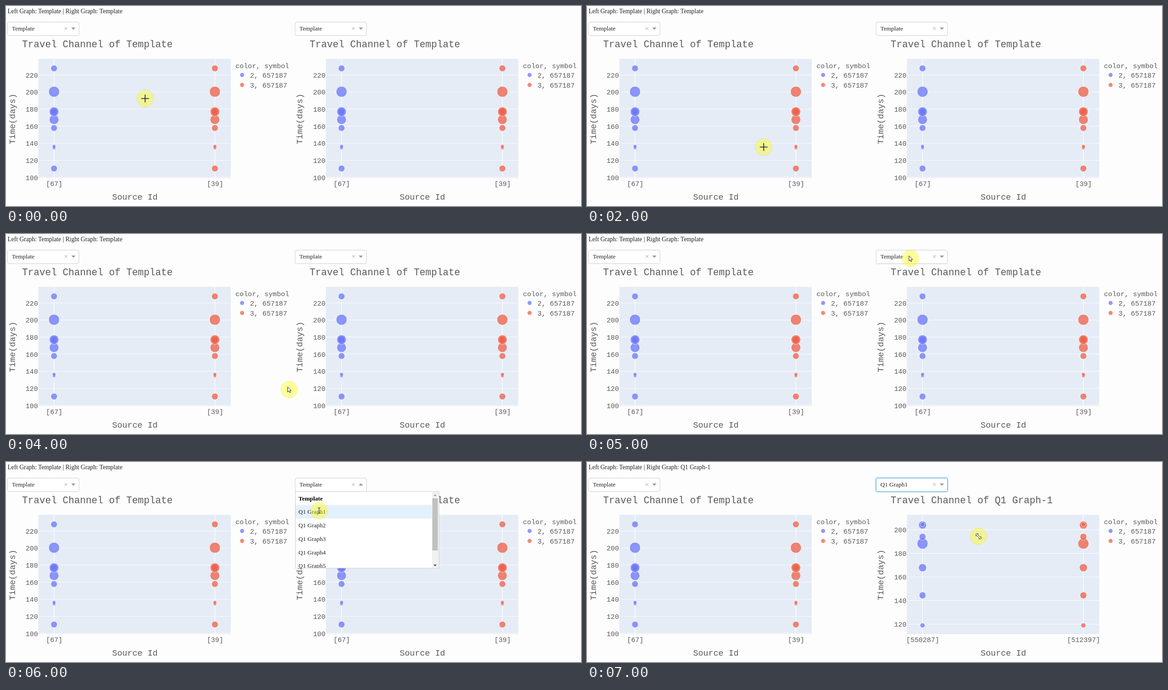
Write an HTML page that moves like this. It is 1269 px wide and 441 px high and loops after 8 s.

```html
<!DOCTYPE html>
<html lang="en">
<head>
<meta charset="utf-8">
<title>Two scatter graphs</title>
<style>
html, body { margin: 0; width: 100%; height: 100%; overflow: hidden; background: #fdfdfd; }
svg { display: block; }
text { white-space: pre; }
.serif { font: 13.5px "Liberation Serif", serif; fill: #222; }
.head { font-size: 13.7px; }
.mono { font: 15.2px "Liberation Mono", monospace; fill: #5a5a5a; }
.title { font-size: 21.3px; }
.axis { font-size: 18.6px; }
.tip { font: 11.1px "Liberation Sans", sans-serif; fill: #fff; }
</style>
</head>
<body>
<svg id="stage" width="1269" height="441" viewBox="0 0 1269 441"></svg>
<script>
const stage = document.getElementById('stage');
const RIGHT = 634.5, STEP = 500, STEPS = 16;
const SERIES = [
  { x: 106, color: '#636efa', id: 2 },
  { x: 461, color: '#ef553b', id: 3 }
];

// dots: [y, radius] in drawing order
const TEMPLATE = {
  name: 'Template', ids: ['[67]', '[39]'], top: 220, topY: 152, gap: 37.67, ticks: 7,
  dots: [[250.5, 10.5], [233, 7.5], [233, 10.5], [189, 12], [137.5, 7.2], [269, 7.2], [313, 3.8], [309.5, 4], [358.3, 7.2]]
};
const Q1 = {
  name: 'Q1 Graph-1', ids: ['[550287]', '[512397]'], top: 200, topY: 149.5, gap: 52, ticks: 5,
  dots: [[139, 8.7], [137.7, 4.5], [180, 12], [165, 7.5], [233, 8.8], [294, 7.5], [360.3, 5.4]]
};

// one pointer place per half second: [x, y, shape]
const POINTER = [
  [307, 204, 'cross'], [182, 308, 'cross'], [95, 129, 'cross'], [118, 280, 'cross'],
  [390, 311, 'cross'], [510, 307, 'arrow'], [455, 99, 'arrow'], [406, 315, 'cross'],
  [625, 343, 'arrow'], [731, 89, 'arrow'], [714, 54, 'arrow'], [712, 61, 'arrow'],
  [691, 107, 'beam'], [693, 108, 'arrow'], [864, 164, 'resize'], [864, 164, 'resize']
];
const TIPS = { 2: [0, 137.5, '227.422'], 3: [0, 358.3, '110.4'], 6: [1, 137.5, '227.422'] };

const SHAPES = {
  cross: '<path d="M-8.5 0H8.5M0-8.5V8.5" stroke="#16163a" stroke-width="1.6"/>',
  arrow: '<path d="M-3.5-6V5.5L-.8 3 1.2 7 3 6.2 1.2 2.2H4.6Z" fill="#fff" stroke="#222"/>',
  beam: '<path d="M-3-6H-1L0-5 1-6H3M0-5V5M-3 6H-1L0 5 1 6H3" fill="none" stroke="#333" stroke-width="1.2"/>',
  resize: '<path d="M-5.5-5.5H-.5L-2-4 4 2 5.5.5V5.5H.5L2 4-4-2-5.5-.5Z" fill="#fff" stroke="#333"/>'
};

const text = (x, y, s, cls, extra = '') => `<text x="${x}" y="${y}" class="${cls}" ${extra}>${s}</text>`;
const rect = (x, y, w, h, extra) => `<rect x="${x}" y="${y}" width="${w}" height="${h}" ${extra}/>`;
const circle = (x, y, r, extra) => `<circle cx="${x}" cy="${y}" r="${r}" ${extra}/>`;
const group = (x, y, s) => `<g transform="translate(${x} ${y})">${s}</g>`;
const MIDDLE = 'text-anchor="middle"', END = 'text-anchor="end"';

function graph(g) {
  let s = text(35.5, 91, 'Travel Channel of ' + g.name, 'mono title');
  s += rect(71.5, 116.5, 424.5, 263, 'fill="#e5ecf6"');
  for (let i = 0; i < g.ticks; i++) {
    const y = g.topY + i * g.gap;
    s += `<path d="M71.5 ${y}H496" stroke="#fff" stroke-width=".9"/>`;
    s += text(70.5, y + 5.5, g.top - i * 20, 'mono', END);
  }
  SERIES.forEach(({ x, color, id }, i) => {
    s += `<path d="M${x} 116.5V379.5" stroke="#fff" stroke-width="1.2"/>`;
    s += text(x + .5, 396.5, g.ids[i], 'mono', MIDDLE);
    for (const [y, r] of g.dots) s += circle(x, y, r, `fill="${color}" stroke="#fff" opacity=".7"`);
    s += circle(521, 152 + 22 * i, 4.5, `fill="${color}" opacity=".7"`);
    s += text(538.5, 158 + 22 * i, id + ', 657187', 'mono');
  });
  s += text(506.5, 136.5, 'color, symbol', 'mono');
  s += text(284.5, 427, 'Source Id', 'mono axis', MIDDLE);
  return s + text(0, 0, 'Time(days)', 'mono axis', MIDDLE + ' transform="translate(19.5 249) rotate(-90)"');
}

function picker(label, { open, focus, hover } = {}) {
  const glow = focus ? rect(2, 33.5, 160.5, 33, 'rx="5" fill="none" stroke="#0088cc" stroke-opacity=".15" stroke-width="2.5"') : '';
  const shade = hover ? '<path d="M5 66.2H160" stroke="#000" stroke-opacity=".07"/>' : '';
  const mark = open ? 'M144 52h9.4l-4.7-5Z' : 'M144 47.5h9.4l-4.7 5Z';
  return glow + shade
    + rect(3.5, 35.5, 157.5, 29.8, `rx="3.4" fill="#fff" stroke="${focus ? '#3b9fd4' : '#ccc'}"`)
    + text(13, 54.3, label, 'serif')
    + '<path d="M129.2 46.5l6 6m0-6l-6 6" stroke="#999"/>'
    + `<path d="${mark}" fill="#999"/>`;
}

function menu(active) {
  const names = ['Template', ...[1, 2, 3, 4, 5].map(n => 'Q1 Graph' + n)];
  let s = rect(638.5, 65, 317, 169, 'fill="#fff" stroke="#ccc"');
  s += rect(639, 65 + active * 29.75, 301, 29.75, 'fill="#e4f0fc"');
  s += '<clipPath id="list"><rect x="639" y="65" width="301" height="168.5"/></clipPath><g clip-path="url(#list)">';
  names.forEach((n, i) => s += text(645.5, 84.5 + i * 29.75, n, 'serif', i ? '' : 'style="font-weight:bold;fill:#000"'));
  s += '</g>' + rect(940, 65.5, 14.5, 168, 'fill="#f1f1f1"') + rect(941, 80, 12, 115, 'fill="#c1c1c1"');
  return s + '<path d="M943.5 75h7l-3.5-4Z" fill="#a3a3a3"/><path d="M943.5 226h7l-3.5 4Z" fill="#505050"/>';
}

function tip([i, y, value]) {
  const { x, color, id } = SERIES[i];
  const lines = ['color=' + id, 'symbol=657187', 'x=' + TEMPLATE.ids[i], 'y=' + value, 'size=300', 'hover_data_0=300'];
  return group(x, y, `<path d="M7.5 0l5.5-5V-44H111V44H13V5Z" fill="${color}"/>`
    + lines.map((l, n) => text(15, -31.3 + n * 14.3, l, 'tip')).join(''));
}

function draw(step) {
  const open = step === 11 || step === 12, chosen = step > 12, loaded = step > 13;
  const [x, y, shape] = POINTER[step];
  stage.innerHTML =
    text(3.5, 16, 'Left Graph: Template | Right Graph: ' + (loaded ? Q1 : TEMPLATE).name, 'serif head')
    + graph(TEMPLATE) + picker('Template')
    + group(RIGHT, 0, graph(loaded ? Q1 : TEMPLATE)
      + picker(chosen ? 'Q1 Graph1' : 'Template', { open, focus: chosen, hover: step === 10 }))
    + (open ? menu(step - 11) : '')
    + (TIPS[step] ? tip(TIPS[step]) : '')
    + group(x, y, circle(0, 0, 18.5, 'fill="#ff0" fill-opacity=".4" stroke="#cc6" stroke-opacity=".3"') + SHAPES[shape]);
}

let shown = -1;
const start = performance.now();
function tick() {
  const step = Math.floor((performance.now() - start) / STEP) % STEPS;
  if (step !== shown) draw(shown = step);
  requestAnimationFrame(tick);
}
tick();
</script>
</body>
</html>
```
